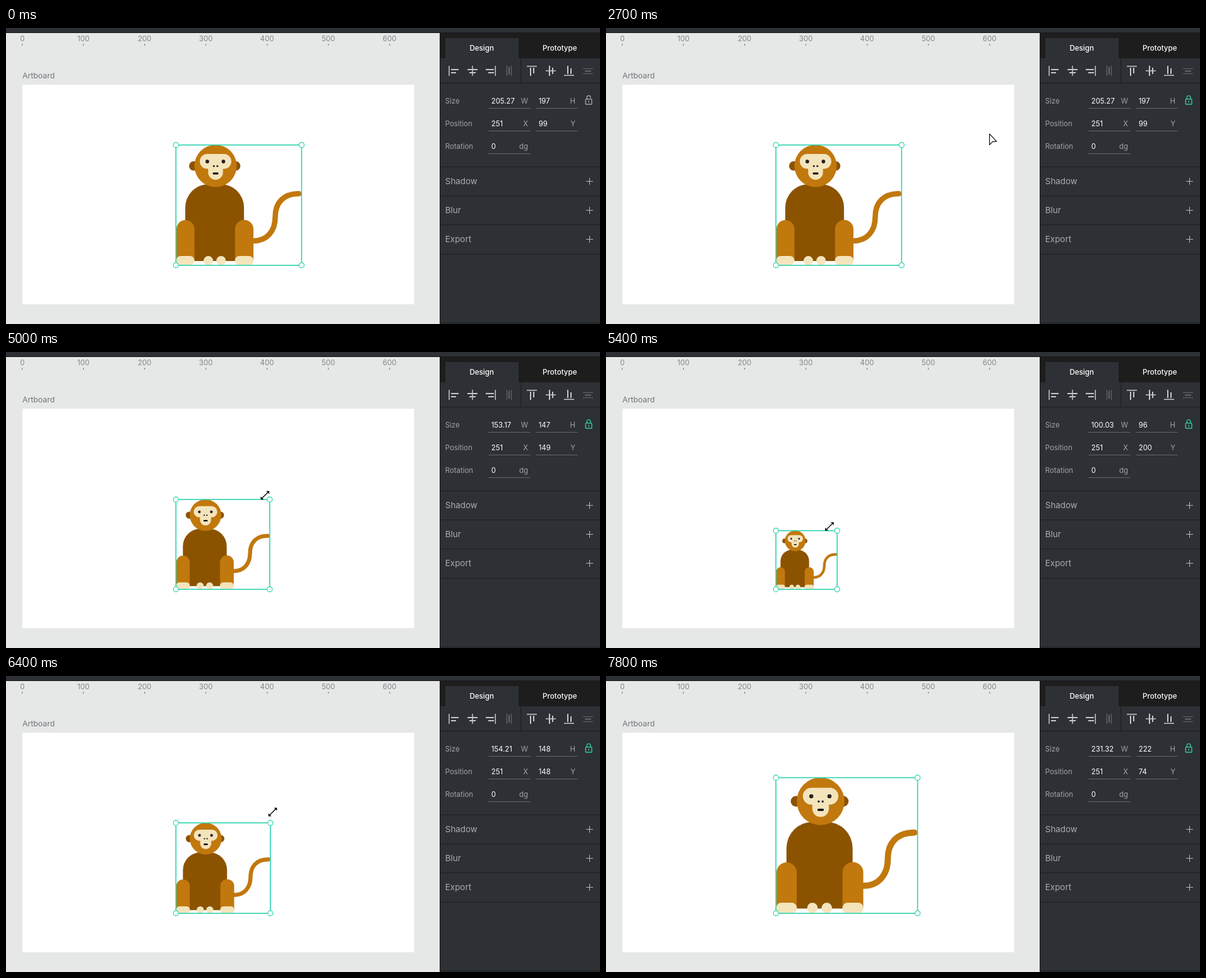
Animation, 941 px wide and 470 px high, one loop 9000 ms. Source, as an HTML page:

```html
<!DOCTYPE html>
<html lang="en">
<head>
<meta charset="utf-8">
<title>Proportional resize</title>
<style>
  html, body { margin: 0; width: 100%; height: 100%; overflow: hidden; background: #e6e8e7; }
  svg { display: block; width: 941px; height: 470px; }
  text { font: 11.4px Inter, "Open Sans", sans-serif; }
  .ruler { fill: #80858a; font-size: 11.5px; text-anchor: middle; }
  .title { fill: #6f7479; font-size: 12.3px; }
  .tab { fill: #fff; font-size: 11.6px; font-weight: 500; text-anchor: middle; }
  .label { fill: #a0a4a8; }
  .unit { fill: #a0a4a8; text-anchor: end; }
  .value { fill: #fff; }
  .section { fill: #a9adb1; font-size: 13.4px; }
  .fur { fill: #c1780d; }
  .dark { fill: #8b5300; }
  .cream { fill: #f4e4bc; }
</style>
</head>
<body>
<svg viewBox="0 0 941 470">
  <rect width="941" height="470" fill="#e6e8e7"/>
  <g id="ruler"></g>
  <text class="title" x="26" y="80">Artboard</text>
  <rect x="26" y="90" width="620.5" height="348.5" fill="#fff"/>

  <g id="monkey">
    <path d="M385 338H392C413 338 426.5 323 426.5 300S440 263 464 263" fill="none" stroke="#c1780d" stroke-width="8.6" stroke-linecap="round"/>
    <path class="dark" d="M284 370V285A37 37 0 0 1 321 248H340A37 37 0 0 1 377 285V370Z"/>
    <g class="dark"><circle cx="297.5" cy="219" r="7.5"/><circle cx="363.8" cy="219" r="7.5"/></g>
    <circle class="fur" cx="332" cy="219" r="33.5"/>
    <g class="cream">
      <rect x="307" y="200" width="50" height="23.6" rx="11.8"/>
      <path d="M320.3 212H343.7V229.3A11.7 11.7 0 0 1 320.3 229.3Z"/>
    </g>
    <g fill="#2a2022">
      <circle cx="318.9" cy="212" r="2.9"/><circle cx="344.4" cy="212" r="2.9"/>
      <circle cx="329.3" cy="219.2" r="1.5"/><circle cx="334.9" cy="219.2" r="1.5"/>
    </g>
    <rect x="327.7" y="229.4" width="8.7" height="3.1" rx="1" fill="#000"/>
    <path class="fur" d="M270 370V319.3a14.2 14.2 0 0 1 28.5 0V370ZM362.8 370V319.3a14.6 14.6 0 0 1 29.2 0V370Z"/>
    <g class="cream">
      <rect x="269.6" y="362" width="29" height="14.8" rx="7"/>
      <rect x="362.7" y="362" width="29.4" height="14.8" rx="7"/>
      <circle cx="320.5" cy="369.4" r="7.4"/><circle cx="340.7" cy="369.4" r="7.4"/>
    </g>
  </g>

  <g stroke="#2dd2b0">
    <rect id="frame" fill="none" stroke-width="1.6"/>
    <g id="handles" fill="#fff" stroke-width="1.2"></g>
  </g>

  <rect width="941" height="8" fill="#2d3034"/>
  <rect y="7" width="941" height="1" fill="#17191b"/>
  <rect x="687" y="8" width="254" height="462" fill="#2d3034"/>
  <rect x="688" y="8" width="253" height="40" fill="#1d1d1e"/>
  <rect x="687" y="8" width="1" height="462" fill="#1d1d1e"/>
  <rect x="696" y="16" width="116" height="32" fill="#2d3034"/>
  <text class="tab" x="753.7" y="36">Design</text>
  <text class="tab" x="877.3" y="36">Prototype</text>
  <path d="M688 87.5H941M815.5 48V87M688 220.5H941M688 266.5H941M688 312.5H941M688 359.5H941M688 468.5H941" stroke="#1d1f21"/>

  <g fill="none" stroke="#c3c6c9" stroke-width="2">
    <path d="M705 66H717M705 71H713M731 66H747M734 71H744M760 66H773M764 71H773"/>
    <path d="M831 63V76M836 63V72M861 60V76M866 63V73M890 60V73M895 64V73"/>
    <path stroke-width="1.5" d="M702 60V76M739 60V76M775.3 60V76M825 60.8H841M855 68H871M884 75.2H900"/>
    <path stroke="#63676b" stroke-width="1.2" d="M793.5 60V76M800.5 60V76M914 64.5H930M914 72.5H930"/>
    <path stroke="#63676b" d="M797 62V74M917 68.5H927"/>
  </g>

  <g id="panel"></g>
  <g id="lock" fill="none" stroke-width="1.2">
    <rect x="918.2" y="112.8" width="9.8" height="8.4" rx="1"/>
    <path d="M923.1 115.5V118.5"/>
    <path id="shackle"/>
  </g>

  <path id="arrow" d="M.7 .6V18L5.4 13.2L12 12.6Z" fill="#fff" stroke="#111" stroke-width="1.2" stroke-linejoin="round"/>
  <g id="resize">
    <path d="M-5.5 5.5L5.5 -5.5" stroke="#000" stroke-width="1.3"/>
    <path d="M6.8 -6.8V-2L2 -6.8ZM-6.8 6.8V2L-2 6.8Z"/>
  </g>
</svg>
<script>
const $ = id => document.getElementById(id);
const LOOP = 9000, STEP = 100;
const ZOOM = 0.97, FULL_W = 205.27, FULL_H = 197, BOTTOM = 296;
const LEFT = 269.2, BASE = 376.8;

const linear = u => u;
const out = u => 1 - (1 - u) ** 1.9;

// [time, height, easing toward this key]
const heights = [
  [4600, 197], [5400, 96], [5600, 86], [5900, 86],
  [6400, 148], [6800, 198], [6900, 198], [7000, 207], [7200, 222]
];
// [time, [x, y], easing toward this key]
const pointer = [
  [600, [700, 450]], [1400, [924, 114], out], [2300, [924, 114]],
  [3200, [452.5, 193.5], out], [3300, [452.5, 193.5]], [3400, [452.5, 192.5]],
  [3500, [452.5, 192.5]], [3900, [466.5, 178]], [4600, [466.5, 178]],
  [5400, [354, 277]], [5600, [344, 287]], [5900, [344, 287]],
  [6400, [422.5, 216]], [6800, [464, 178]], [6900, [464, 178]],
  [7000, [468, 170]], [7200, [482, 155]], [7500, [482, 155]], [7700, [505, 100]]
];

const mix = (a, b, u) => Array.isArray(a) ? a.map((v, i) => mix(v, b[i], u)) : a + (b - a) * u;

function at(keys, t) {
  const i = keys.findIndex(k => k[0] >= t);
  if (i < 0) return keys[keys.length - 1][1];
  if (i === 0) return keys[0][1];
  const [t0, a] = keys[i - 1], [t1, b, ease = linear] = keys[i];
  return mix(a, b, ease((t - t0) / (t1 - t0)));
}

const set = (el, attrs) => { for (const k in attrs) el.setAttribute(k, attrs[k]); };

function add(parent, tag, attrs, text = "") {
  const el = document.createElementNS("http://www.w3.org/2000/svg", tag);
  set(el, attrs);
  el.textContent = text;
  return parent.appendChild(el);
}

for (let i = 0; i < 7; i++) {
  const x = 26 + i * 97;
  add($("ruler"), "text", { class: "ruler", x: x - (i ? 0.4 : 0), y: 21 }, i * 100);
  add($("ruler"), "rect", { x: x - 1, y: 25, width: 1.2, height: 3, fill: "#80858a" });
}

function field(x, y, unit) {
  const panel = $("panel");
  add(panel, "path", { d: `M${x} ${y + 7.5}h66`, stroke: "#64686c" });
  add(panel, "text", { class: "unit", x: x + 62.5, y }, unit);
  return add(panel, "text", { class: "value", x: x + 4.2, y }, "0");
}

["Size", "Position", "Rotation"].forEach((name, i) =>
  add($("panel"), "text", { class: "label", x: 695.8, y: 120 + i * 36 }, name));
["Shadow", "Blur", "Export"].forEach((name, i) => {
  const y = 243.5 + i * 46;
  add($("panel"), "text", { class: "section", x: 695.8, y: y + 4.8 }, name);
  add($("panel"), "path", { d: `M919 ${y}h11M924.5 ${y - 5.5}v11`, stroke: "#b4b7ba" });
});

const wField = field(764.5, 120, "W"), hField = field(839.5, 120, "H");
const xField = field(764.5, 156, "X"), yField = field(839.5, 156, "Y");
field(764.5, 192, "dg");
xField.textContent = "251";

const handles = [0, 1, 2, 3].map(() => add($("handles"), "circle", { r: 4.1 }));

function drawSelection(t) {
  const h = Math.round(at(heights, t)), scale = h / FULL_H;
  const w = FULL_W * scale;
  const right = LEFT + w * ZOOM, top = BASE - h * ZOOM;
  set($("monkey"), { transform: `translate(${LEFT} ${BASE}) scale(${scale}) translate(${-LEFT} ${-BASE})` });
  set($("frame"), { x: LEFT, y: top, width: right - LEFT, height: BASE - top });
  handles.forEach((c, i) => set(c, { cx: i % 2 ? right : LEFT, cy: i < 2 ? top : BASE }));
  wField.textContent = w.toFixed(2);
  hField.textContent = h;
  yField.textContent = BOTTOM - h;
}

function drawLock(locked) {
  set($("lock"), { stroke: locked ? "#35dfb2" : "#b4b7ba" });
  set($("shackle"), {
    d: locked ? "M920.2 112.8V110.4a2.9 2.9 0 0 1 5.8 0V112.8"
              : "M920.2 112.8V110.2a2.9 2.9 0 0 1 5.8 0V110.8"
  });
}

function drawPointer(t) {
  const shown = t >= 600 && t < 7800;
  const resizing = t >= 3700 && t < 7600;
  const transform = `translate(${at(pointer, t)})`;
  set($("arrow"), { transform, visibility: shown && !resizing ? "visible" : "hidden" });
  set($("resize"), { transform, visibility: resizing ? "visible" : "hidden" });
}

const start = performance.now();
function draw() {
  const elapsed = (performance.now() - start) % LOOP;
  const t = Math.floor(elapsed / STEP) * STEP;
  drawSelection(t);
  drawLock(t >= 2100);
  drawPointer(t);
  requestAnimationFrame(draw);
}
draw();
</script>
</body>
</html>
```
